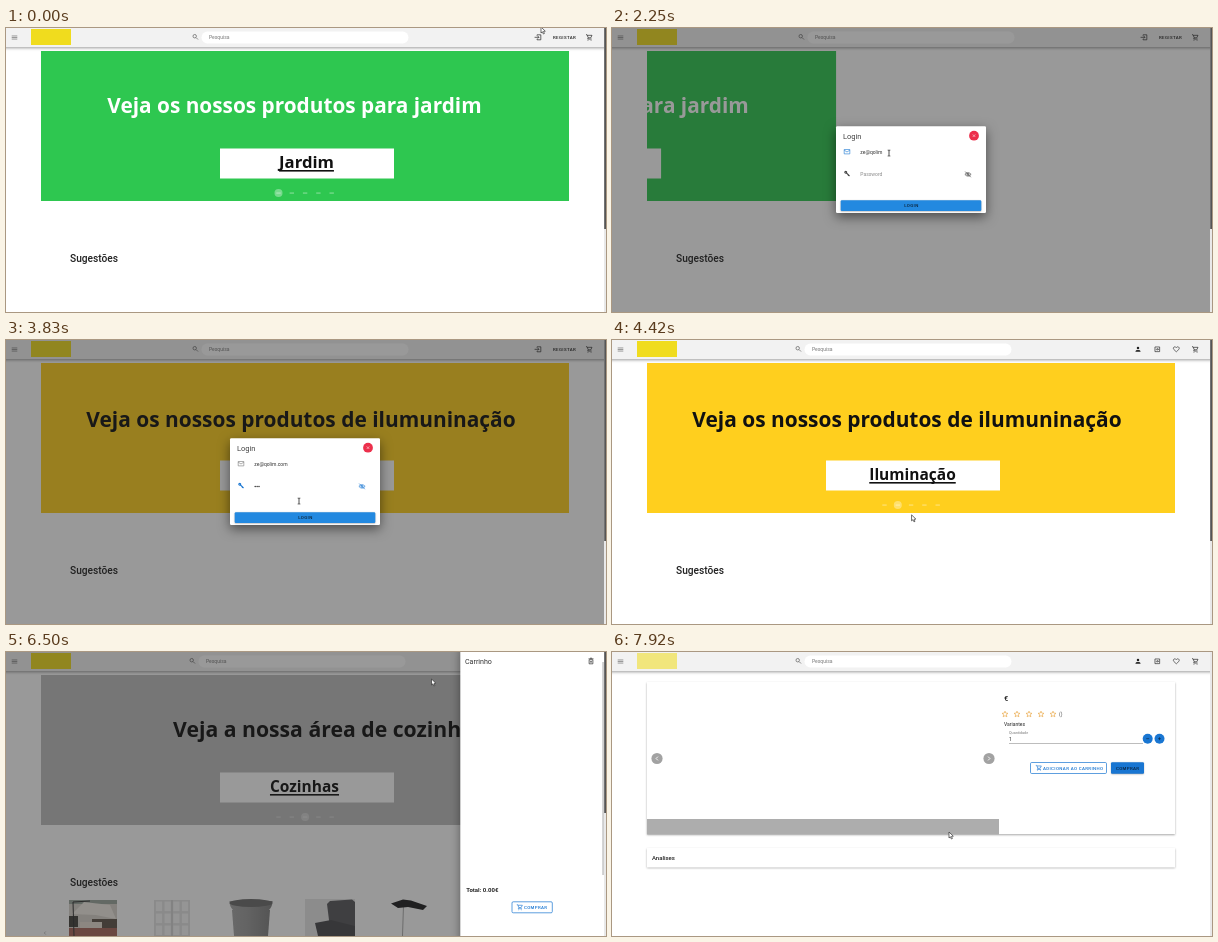
Write an HTML page with a canvas that moves like this. It is 600 px wide and 284 px high and loops after 8 s.

```html
<!DOCTYPE html>
<html lang="pt">
<head>
<meta charset="utf-8">
<title>Loja</title>
<style>
html, body { margin: 0; width: 100%; height: 100%; overflow: hidden; background: #fff; }
canvas { display: block; width: 600px; height: 284px; }
</style>
</head>
<body>
<canvas id="stage"></canvas>
<script>
const W = 600, H = 284, LOOP = 8000;
const canvas = document.getElementById('stage');
const ctx = canvas.getContext('2d');
const dpr = window.devicePixelRatio || 1;
canvas.width = W * dpr;
canvas.height = H * dpr;

const BLUE = '#1976d2', INK = '#222', GREY = '#8a8a8a';
const UI = 'Roboto, sans-serif', AD = '"Open Sans", sans-serif';
const EMAIL = 'ze@qolim.com';

// Moments of the story, in ms
const OPEN = 470, FOCUS = 900, TYPE = 1400, PASS = 2800, CLOSE = 4180;
const LOGGED = 4260, LOADED = 4700, CART_IN = 5830, CART_OUT = 6680, PRODUCT = 7750;
const SLIDES = [2168, 4990];

const clamp = v => Math.max(0, Math.min(1, v));
const ramp = (t, from, len) => clamp((t - from) / len);
const smooth = p => p * p * (3 - 2 * p);

function bezier(x1, y1, x2, y2) {
  const at = (a, b, s) => 3 * (1 - s) * (1 - s) * s * a + 3 * (1 - s) * s * s * b + s * s * s;
  return x => {
    let lo = 0, hi = 1;
    for (let i = 0; i < 20; i++) {
      const mid = (lo + hi) / 2;
      if (at(x1, x2, mid) < x) lo = mid; else hi = mid;
    }
    return x <= 0 ? 0 : x >= 1 ? 1 : at(y1, y2, lo);
  };
}
const swing = bezier(.25, .8, .5, 1);
const standard = bezier(.4, 0, .2, 1);

function rect(x, y, w, h, color) {
  ctx.fillStyle = color;
  ctx.fillRect(x, y, w, h);
}

function round(x, y, w, h, r, color, line) {
  ctx.beginPath();
  ctx.roundRect(x, y, w, h, r);
  paint(color, line);
}

function paint(color, line) {
  if (line) {
    ctx.lineWidth = line;
    ctx.strokeStyle = color;
    ctx.stroke();
  } else {
    ctx.fillStyle = color;
    ctx.fill();
  }
}

function disc(x, y, r, color) {
  ctx.beginPath();
  ctx.arc(x, y, r, 0, Math.PI * 2);
  paint(color);
}

function poly(points, color, line) {
  ctx.beginPath();
  for (let i = 0; i < points.length; i += 2) ctx.lineTo(points[i], points[i + 1]);
  if (!line) ctx.closePath();
  paint(color, line);
}

function text(s, x, y, size, color, o = {}) {
  ctx.font = `${o.weight || 400} ${size}px ${o.font || UI}`;
  ctx.letterSpacing = (o.gap || 0) + 'px';
  ctx.textAlign = o.align || 'left';
  ctx.fillStyle = color;
  ctx.fillText(s, x, y);
}
const caps = (s, x, y, color) => text(s, x, y, 4.4, color, { weight: 500, gap: .36 });

function shadowed(blur, dy, alpha, draw) {
  ctx.save();
  ctx.shadowColor = `rgba(0,0,0,${alpha})`;
  ctx.shadowBlur = blur * dpr;
  ctx.shadowOffsetY = dy * dpr;
  draw();
  ctx.restore();
}

// Icons on a 24 unit grid: [path, line width or 0 for filled]
const icons = {
  menu: ['M3 7H21M3 12H21M3 17H21', 2],
  search: ['M9.5 4A5.5 5.5 0 1 0 9.5 15A5.5 5.5 0 1 0 9.5 4M14 14L20 20', 2.4],
  login: ['M9 7V4H21V20H9V17M1 12H15M11 8L15 12L11 16', 2.2],
  leave: ['M4 4H20V20H4ZM7 12H16M12 8L16 12L12 16', 2.2],
  person: ['M12 4A4 4 0 1 0 12 12A4 4 0 1 0 12 4ZM4 20V18Q4 14 12 14Q20 14 20 18V20Z', 0],
  heart: ['M12 20L4 12.5C1 9 3 4 7.5 4Q10.5 4 12 6.5Q13.5 4 16.5 4C21 4 23 9 20 12.5Z', 2],
  cart: ['M1 3H4L8 13H16L20 5H5M8 13L6 17H19M7 20V22M17 20V22', 2.2],
  mail: ['M3 5H21V19H3ZM3 7L12 13L21 7', 1.9],
  key: ['M8 5A3 3 0 1 0 8 11A3 3 0 1 0 8 5M10 10L20 20M15 19L18 16', 3.6],
  eye: ['M2 12Q12 1 22 12Q12 23 2 12ZM12 9A3 3 0 1 0 12 15A3 3 0 1 0 12 9M3 3L21 21', 2.2],
  trash: ['M6 8H18V21H6ZM4 5H20M9 3H15M10 12L14 17M14 12L10 17', 2.3],
  star: ['M12 3L14.7 9.2L21.5 9.8L16.3 14.2L17.9 20.8L12 17.3L6.1 20.8L7.7 14.2L2.5 9.8L9.3 9.2Z', 2],
  cross: ['M6 6L18 18M18 6L6 18', 2.5],
  left: ['M15 6L9 12L15 18', 2.8],
  right: ['M9 6L15 12L9 18', 2.8],
  minus: ['M5 12H19', 3],
  plus: ['M5 12H19M12 5V19', 3]
};

function icon(name, x, y, color, size = 7.5) {
  const [d, line] = icons[name];
  ctx.save();
  ctx.translate(x - size / 2, y - size / 2);
  ctx.scale(size / 24, size / 24);
  const path = new Path2D(d);
  ctx.lineWidth = line;
  ctx.strokeStyle = ctx.fillStyle = color;
  line ? ctx.stroke(path) : ctx.fill(path);
  ctx.restore();
}

function header(t) {
  const logged = t >= LOGGED, dx = logged ? -3 : 0;
  shadowed(3, 1, .4, () => rect(-5, -5, W + 10, 24, '#f2f2f2'));
  icon('menu', 8.5, 9.5, '#666');
  ctx.globalAlpha = t < PRODUCT ? 1 : ramp(t, 7700, 400);
  rect(25, 1, 40, 16, '#f0dc1e');
  ctx.globalAlpha = 1;
  icon('search', 189.5 + dx, 9, '#666');
  round(195.5 + dx, 3.5, 207, 12, 6, '#fff');
  text('Pesquisa', 203 + dx, 11, 5, '#777');
  if (logged) {
    icon('person', 526, 9.3, INK);
    icon('leave', 545.3, 9.3, INK, 7);
    icon('heart', 564.3, 9.3, INK);
  } else {
    icon('login', 532, 9.3, INK);
    caps('REGISTAR', 547, 11, INK);
  }
  icon('cart', 583.5, 9.5, INK);
}

const ads = [
  { color: '#2ec750', ink: '#fff', title: 'Veja os nossos produtos para jardim', x: 288.5, y: 84.5, size: 20.8, label: 'Jardim', mid: 300.5, small: 16.7 },
  { color: '#ffcf1e', ink: '#111', title: 'Veja os nossos produtos de ilumuninação', x: 295, y: 86.5, size: 20.9, label: 'Iluminação', mid: 300.5, small: 15.5 },
  { color: '#bebebe', ink: '#111', title: 'Veja a nossa área de cozinha', x: 317.5, y: 85, size: 21.2, label: 'Cozinhas', mid: 298.5, small: 15.5 }
];

function ad(i, dx, alpha) {
  const a = ads[i], o = { weight: 700, font: AD, align: 'center' };
  ctx.save();
  ctx.globalAlpha = alpha;
  ctx.translate(dx, 0);
  rect(35, 23, 528, 150, a.color);
  text(a.title, a.x, a.y, a.size, a.ink, o);
  rect(214, 120.5, 174, 30, '#fff');
  text(a.label, a.mid, 140.3, a.small, '#111', o);
  const w = ctx.measureText(a.label).width;
  rect(a.mid - w / 2, 142, w, 1.6, '#111');
  ctx.restore();
}

function carousel(t) {
  const n = SLIDES.filter(s => t >= s).length;
  ctx.save();
  ctx.beginPath();
  ctx.rect(35, 23, 528, 150);
  ctx.clip();
  if (n === 0) ad(0, 0, 1);
  else {
    const start = SLIDES[n - 1], p = swing(ramp(t, start, 300));
    if (p < 1) ad(n - 1, -528 * p, 1);
    ad(n, 528 * (1 - p), ramp(t, start + 90, 250));
  }
  for (let i = 0; i < 5; i++) {
    const x = 272.5 + i * 13.3;
    if (i === n) disc(x, 165, 4, 'rgba(255,255,255,.35)');
    rect(x - 2.2, 164.6, 4.4, .9, 'rgba(255,255,255,.5)');
  }
  ctx.restore();
}

// A speckled cloth filling the given outline
function cloth(points, color, dots) {
  poly(points, color);
  ctx.save();
  ctx.clip();
  const [x] = points;
  for (let i = 0; i < 60; i++) rect(x - 8 + (i * 7) % 50, 248 + (i * 11) % 36, 1, 1, dots);
  ctx.restore();
}

function patio() {
  rect(63, 248, 48, 36, '#d8d2ca');
  rect(63, 248, 48, 4, '#9aa59d');
  rect(63, 264, 9, 11, '#45423d');
  rect(86, 267, 25, 10, '#5f544b');
  rect(63, 276, 48, 8, '#a8685c');
  poly([66, 262, 78, 250, 104, 253, 110, 267, 90, 263], '#f1ece5');
  poly([68, 284, 67, 250, 84, 249], '#333', 1);
  rect(74, 270, 22, 6, '#e6ddd2');
}

function shelf() {
  rect(148, 248, 36, 36, '#e2e2e2');
  for (let r = 0; r < 3; r++)
    for (let c = 0; c < 4; c++) rect(149.8 + c * 8.7, 249.5 + r * 12, 6.3, 9.6, '#f6f6f6');
  rect(165.5, 248, 1, 36, '#c4c4c4');
}

function pot() {
  const shade = ctx.createLinearGradient(223, 0, 266, 0);
  shade.addColorStop(0, '#a6a6a6');
  shade.addColorStop(.4, '#9c9c9c');
  shade.addColorStop(1, '#7e7e7e');
  poly([226, 258, 264, 258, 262, 284, 228, 284], shade);
  round(223.5, 249, 43, 12.5, [0, 0, 12, 12], shade);
  ctx.beginPath();
  ctx.ellipse(245, 251, 21.5, 4, 0, 0, Math.PI * 2);
  paint('#6c6c6c');
}

function sofa() {
  rect(299, 247, 50, 37, '#e6e6e6');
  poly([321, 252, 324, 249, 346, 247.5, 349, 250, 349, 284, 325, 284], '#59595d');
  poly([309, 271, 325, 268, 349, 274, 349, 284, 312, 284], '#4a4a4e');
}

function parasol() {
  poly([397.5, 253, 396.5, 284], '#aaa', 1);
  poly([385, 251.5, 397, 247.5, 405, 248.5, 421, 254, 417, 258, 402, 255, 392, 256], '#202022');
}

function towel() {
  cloth([463, 284, 469, 250, 472, 247.5, 497, 247.5, 502, 251, 508, 284], '#d98390', '#ecb2b9');
  poly([501, 251, 482, 268, 477, 284], '#b9636f', 1);
}

function products(t) {
  ctx.save();
  ctx.globalAlpha = ramp(t, LOADED, 300);
  icon('left', 39, 281, '#aaa', 6);
  icon('right', 559, 281, '#777', 6);
  ctx.beginPath();
  ctx.rect(62, 246, 489, 38);
  ctx.clip();
  [patio, shelf, pot, sofa, parasol, towel].forEach(draw => draw());
  cloth([541, 284, 543, 252, 546, 248, 551, 248, 551, 284], '#efcf48', '#f5de80');
  ctx.restore();
}

function home(t) {
  carousel(t);
  text('Sugestões', 64, 233.7, 10.2, INK, { weight: 500 });
  if (t > LOADED) products(t);
}

function productPage() {
  shadowed(2, .8, .35, () => {
    rect(35, 30, 528, 152, '#fff');
    rect(35, 196, 528, 19.5, '#fff');
  });
  rect(35, 167, 352, 15.5, '#adadad');
  [['left', 45], ['right', 377]].forEach(([name, x]) => {
    disc(x, 106.5, 5.6, '#a2a2a2');
    icon(name, x, 106.5, '#fff');
  });
  text('€', 392, 49, 7.5, INK, { weight: 500 });
  for (let i = 0; i < 5; i++) icon('star', 393 + i * 12, 62, '#e9a23b');
  text('()', 447, 64, 5, '#444');
  text('Variantes', 392, 73.5, 5, INK);
  text('Quantidade', 397, 82.3, 3.75, '#777');
  text('1', 397, 89, 5, INK);
  rect(397, 91.3, 134, .6, '#909090');
  [['minus', 535.7], ['plus', 547.5]].forEach(([name, x]) => {
    disc(x, 86.7, 5, BLUE);
    icon(name, x, 86.7, '#0b2540', 5);
  });
  round(418.5, 110.5, 76, 11, 1.2, BLUE, .7);
  icon('cart', 427, 116, BLUE, 7);
  caps('ADICIONAR AO CARRINHO', 431, 117.6, BLUE);
  shadowed(1.5, .6, .35, () => round(499, 110.2, 33, 11.5, 1.2, BLUE));
  caps('COMPRAR', 504, 117.6, '#0b2540');
  text('Analises', 40, 208.3, 6, INK, { weight: 500 });
}

function veil(p) {
  if (p > 0) rect(0, 0, W, H, `rgba(33,33,33,${.46 * p})`);
}

function dialog(t) {
  const p = standard(ramp(t, OPEN, 225)) * (1 - ramp(t, CLOSE, 150));
  if (p <= 0) return;
  const inPass = t >= PASS, mail = t >= FOCUS && !inPass;
  const scale = t < CLOSE ? .5 + .5 * p : 1;
  ctx.save();
  ctx.globalAlpha = p;
  ctx.translate(299, 141.5);
  ctx.scale(scale, scale);
  ctx.translate(-299, -141.5);
  shadowed(12, 4, .5, () => round(224, 98.3, 150, 86.7, 1.2, '#fff'));
  text('Login', 231, 110.6, 7.5, '#444');
  disc(362, 107.7, 4.9, '#ec304c');
  icon('cross', 362, 107.7, '#fff', 5);

  const tint = ramp(t, FOCUS - 60, 60) * (1 - ramp(t, 1250, 200));
  round(241, 116, 126.5, 16.5, 8.2, `rgba(238,238,238,${tint})`);
  icon('mail', 235, 123.7, mail ? BLUE : '#777');
  const typed = Math.floor((t - TYPE) / 105);
  if (typed > 0) text(EMAIL.slice(0, typed), 248.3, 125.8, 5, '#333');
  else if (mail) rect(248.2, 121.8, .6, 5.4, '#333');

  icon('key', 235, 145.5, inPass ? BLUE : '#444');
  icon('eye', 356, 146.4, inPass ? BLUE : '#444');
  if (!inPass) text('Password', 248.3, 148, 5, GREY);
  const dots = Math.min(3, Math.floor((t - 2900) / 130));
  for (let i = 0; i < dots; i++) disc(249.2 + i * 1.9, 146.6, .75, '#333');

  shadowed(1.5, .6, .35, () => round(228.7, 172.2, 140.6, 10.8, 1.2, '#2389e0'));
  caps('LOGIN', 292.2, 179.3, '#0d2438');
  ctx.restore();
}

function drawer(p) {
  if (p <= 0) return;
  ctx.save();
  ctx.translate(146 * (1 - p), 0);
  shadowed(9, 2, .45, () => rect(454.3, -5, 144, H + 10, '#fff'));
  text('Carrinho', 459, 11.7, 7.1, '#333');
  icon('trash', 585, 9, '#333');
  text('Total: 0.00€', 460.3, 239.7, 6, INK, { weight: 700 });
  round(506, 249.8, 40.3, 11, 1.2, BLUE, .7);
  icon('cart', 514, 255.3, BLUE, 7);
  caps('COMPRAR', 518, 256.9, BLUE);
  rect(596.3, 10, 1.5, 213, '#c4c4c4');
  ctx.restore();
}

function scrollbar(t) {
  rect(598, 0, 2, H, '#e9e9e9');
  if (t < PRODUCT) rect(598.2, 0, 1.8, t < LOADED ? 201 : 161, '#555');
}

// Pointer path: time, x, y
const trail = [
  [0, 535, -1], [170, 535, -1], [330, 532, 7], [500, 532, 7], [900, 277, 125],
  [3480, 277, 125], [3740, 293, 161], [3840, 293, 161], [4050, 298, 176], [4380, 298, 176],
  [5250, 541.5, 1.5], [5430, 541.5, 1.5], [5640, 582, 8], [5920, 582, 8],
  [6400, 425.5, 27], [6750, 425.5, 27], [7200, 326, 262], [7500, 326, 262], [7850, 337, 180]
];

function pointer(t) {
  const i = trail.findIndex(k => k[0] > t);
  const b = i < 0 ? trail[trail.length - 1] : trail[i];
  const a = i < 0 ? b : trail[i - 1];
  const p = a === b ? 1 : smooth((t - a[0]) / (b[0] - a[0]));
  const x = a[1] + (b[1] - a[1]) * p, y = a[2] + (b[2] - a[2]) * p;
  ctx.save();
  ctx.translate(x, y);
  if (t > 860 && t < 3920) {
    rect(-.4, -3, .8, 6, '#222');
    rect(-1.4, -3.2, 2.8, .6, '#222');
    rect(-1.4, 2.7, 2.8, .6, '#222');
  } else {
    ctx.beginPath();
    [[0, 0], [0, 6], [1.4, 4.8], [2.4, 7], [3.4, 6.5], [2.5, 4.4], [4.3, 4.2]]
      .forEach(q => ctx.lineTo(...q));
    ctx.closePath();
    paint('#fff');
    paint('#333', .7);
  }
  ctx.restore();
}

function draw(t) {
  ctx.setTransform(dpr, 0, 0, dpr, 0, 0);
  rect(0, 0, W, H, '#fff');
  if (t < PRODUCT) home(t); else productPage();
  header(t);
  veil(ramp(t, OPEN, 200) * (1 - ramp(t, CLOSE, 200)));
  dialog(t);
  const p = standard(ramp(t, CART_IN, 200)) * (1 - standard(ramp(t, CART_OUT, 200)));
  veil(p);
  drawer(p);
  scrollbar(t);
  pointer(t);
}

const begin = performance.now();
function tick() {
  draw((performance.now() - begin) % LOOP);
  requestAnimationFrame(tick);
}
tick();
</script>
</body>
</html>
```
